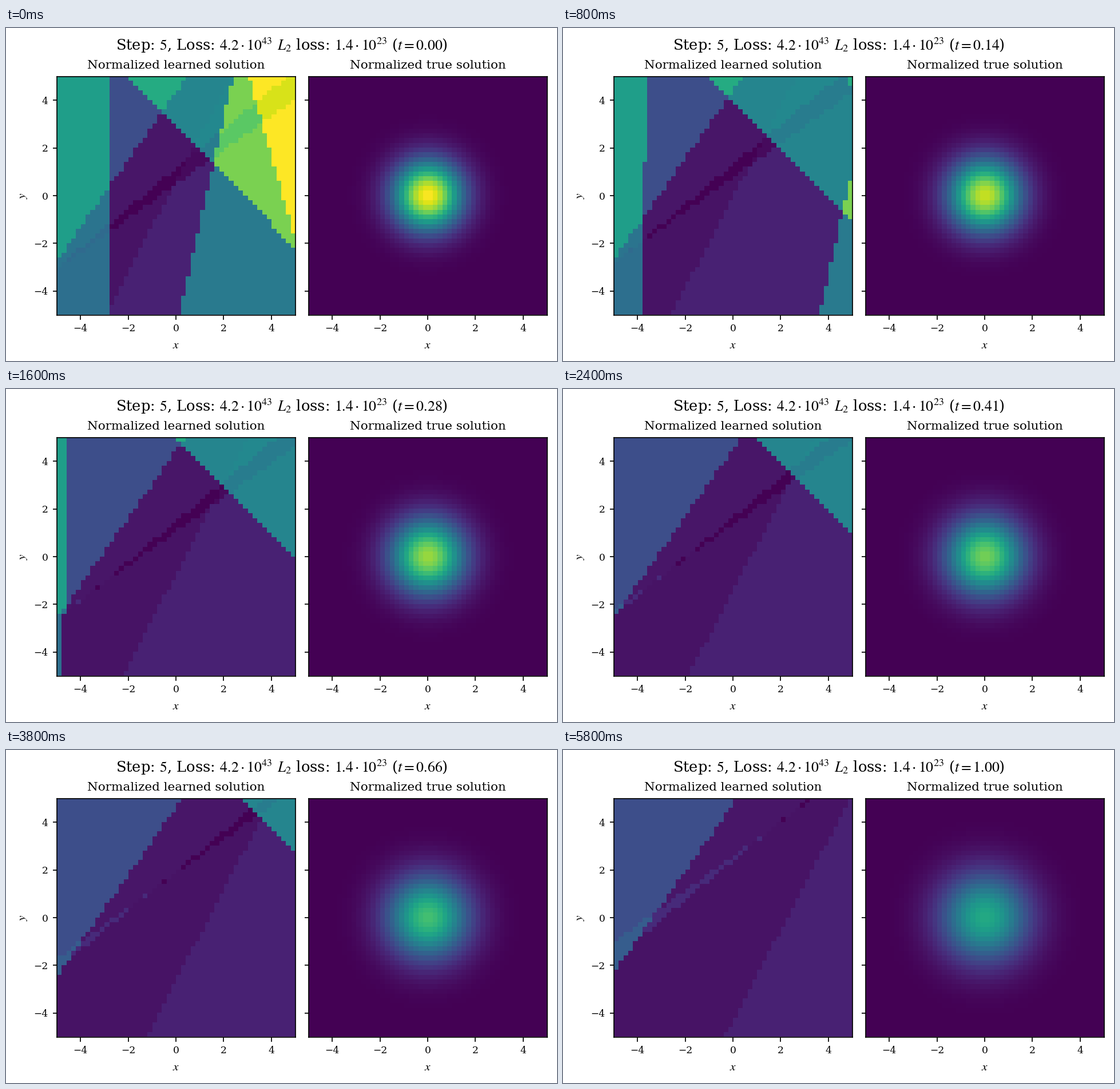
Recreate the animation shown at these times as a matplotlib script. Size 963 by 582 pixels, loop 6000 ms.

```python
import numpy as np
import matplotlib.pyplot as plt
from matplotlib.animation import FuncAnimation
from matplotlib.colors import to_rgb

W, H, DPI = 963, 582, 96
FRAMES, INTERVAL = 30, 200
PT = 72 / DPI  # points per pixel

plt.rcParams.update({
    "font.family": "DejaVu Serif",
    "mathtext.fontset": "stix",
    "axes.linewidth": 1.71 * PT,
    "xtick.labelsize": 17.1 * PT,
    "ytick.labelsize": 17.1 * PT,
})

centers = np.linspace(-4.9, 4.9, 50)
X, Y = np.meshgrid(centers, centers)


def learned(t):
    """Piecewise constant field cut by straight lines that drift with time."""
    left = X < -2.773 + 0.014 * Y - 6.86 * t
    up = Y > 1.413 * X + 4.334 + 0.43 * t
    far = X + Y > 2.86 + 7.4 * t - 0.015 * X
    steep = X > 0.3 + (Y + 4.2) / 4.4 + 25.3 * t
    corner = X > 3.1 + (4.75 - Y) * 0.285 + 12.6 * t
    fold = X > -2.905 + 2.6 * t + (Y + 4.9) / 1.9

    # two nearly parallel lines crossing at a moving point
    cx, cy = -5.75 + 7.4 * t, -3.65 + 7.4 * t
    hi = Y > cy + 0.83 * (X - cx)
    lo = Y > cy + 0.715 * (X - cx)
    dark, light, above, below = lo & ~hi, hi & ~lo, hi & lo, ~hi & ~lo

    img = np.empty(X.shape + (3,))
    img[:] = to_rgb("#471365")
    layers = [
        (above, "#481668"),
        (above & fold, "#470e61"),
        (below & fold, "#482173"),
        (dark, "#440154"),
        (dark & fold, "#460a5d"),
        (light, "#472a7a"),
        (steep, "#297a8e"),
        (up, "#3d4e8a"),
        (up & ~lo, "#365d8d"),
        (left, "#2d6f8e"),
        (left & above, "#2b748e"),
        (left & dark, "#306a8e"),
        (left & up, "#1f9e89"),
        (far, "#25858e"),
        (far & above & fold, "#23888e"),
        (far & dark, "#287c8e"),
        (far & (up | corner), "#25ab82"),
        (far & steep, "#7ad151"),
        (far & steep & dark, "#5ac864"),
        (far & steep & corner, "#fde725"),
        (far & steep & corner & dark, "#d8e219"),
    ]
    for mask, color in layers:
        img[mask] = to_rgb(color)
    return img


def exact(t):
    """Spreading Gaussian."""
    var = 1 + 0.65 * t
    return np.exp(-(X**2 + Y**2) / (2 * var)) / var


def heading(t):
    return (r"Step: $5$, Loss: $4.2\cdot 10^{43}$ $L_2$ loss: "
            r"$1.4\cdot 10^{23}$ ($t=%.2f$)" % t)


fig = plt.figure(figsize=(W / DPI, H / DPI), dpi=DPI, facecolor="white")


def label(x, y, s, px, **kw):
    kw = {"ha": "center", "va": "baseline", **kw}
    return fig.text(x / W, 1 - y / H, s, fontsize=px * PT, **kw)


def panel(x, title, data, **kw):
    side, top = 417, 84.5
    ax = fig.add_axes([x / W, 1 - (top + side) / H, side / W, side / H])
    im = ax.imshow(data, origin="lower", extent=(-5, 5, -5, 5),
                   aspect="auto", interpolation="nearest", **kw)
    ax.set_xticks(range(-4, 5, 2))
    ax.set_yticks(range(-4, 5, 2))
    ax.tick_params(length=7.5 * PT, width=1.71 * PT, pad=7.5 * PT)
    label(x + side / 2, 71, title, 21.4)
    label(x + side / 2, 555, "$x$", 21.4, va="center")
    return ax, im


_, left_im = panel(88.5, "Normalized learned solution", learned(0))
right_ax, right_im = panel(528.5, "Normalized true solution", exact(0),
                           cmap="viridis", vmin=0, vmax=1)
right_ax.tick_params(labelleft=False)
label(30, 293, "$y$", 21.4, va="center", rotation=90)
head = label(W / 2, 38.5, heading(0), 25.7)


def update(i):
    t = i / (FRAMES - 1)
    left_im.set_data(learned(t))
    right_im.set_data(exact(t))
    head.set_text(heading(t))
    return left_im, right_im, head


anim = FuncAnimation(fig, update, frames=FRAMES, interval=INTERVAL,
                     repeat=True, repeat_delay=0)
plt.show()
```
